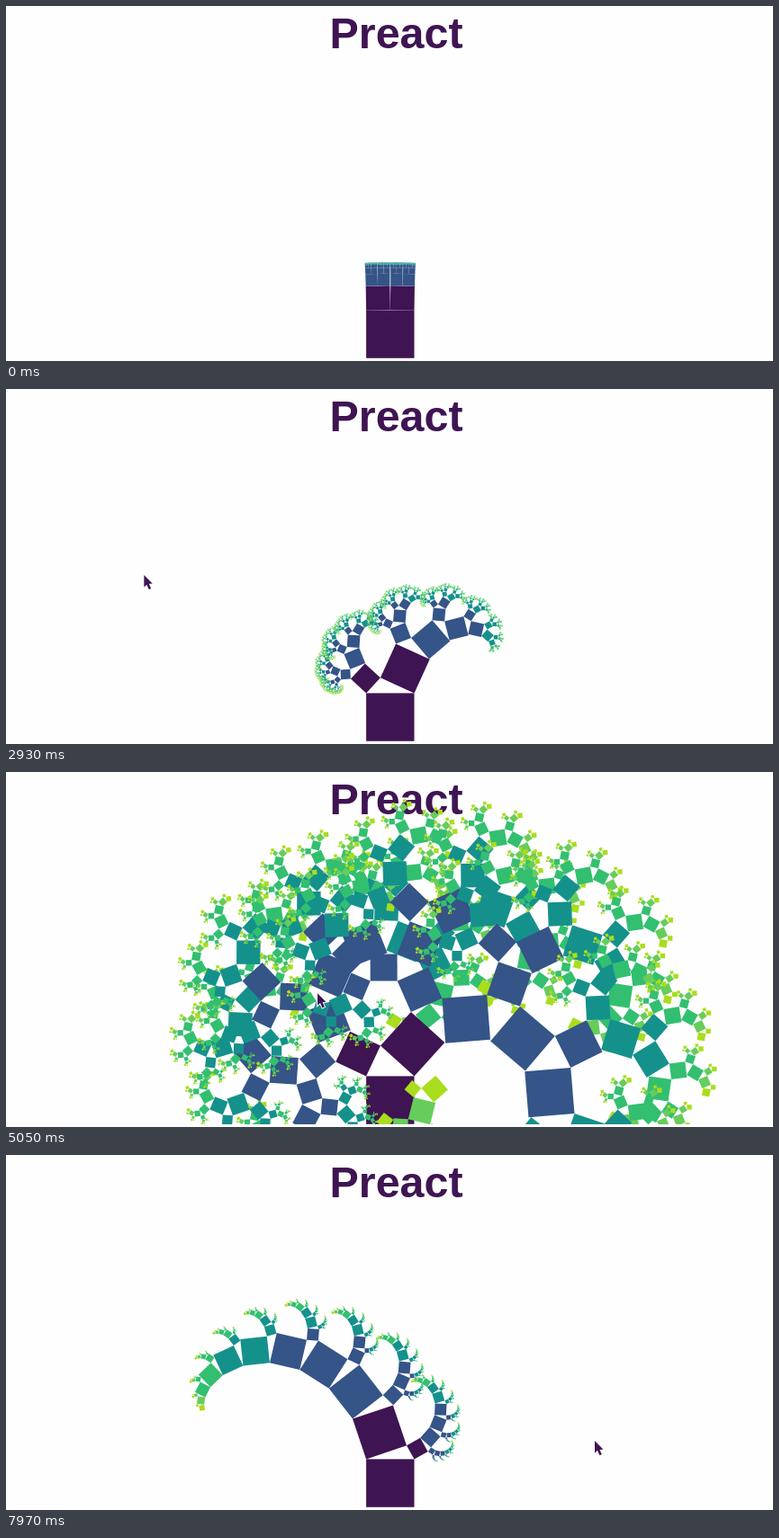
An HTML page with a canvas that plays this animation: 852 by 395 pixels, repeating every 8 s.

```html
<!DOCTYPE html>
<html lang="en">
<head>
<meta charset="utf-8">
<title>Preact</title>
<style>
  html, body { margin: 0; width: 100%; height: 100%; overflow: hidden; background: #fefefe; }
  svg, canvas { position: absolute; left: 0; top: 0; width: 852px; height: 395px; }
  text { font: bold 48.4px "Liberation Sans", Arial, sans-serif; fill: #3f1452; }
</style>
</head>
<body>
<svg viewBox="0 0 852 395"><text x="359.6" y="46.5">Preact</text></svg>
<canvas id="stage" width="852" height="395"></canvas>
<script>
const LOOP = 8000;
const TREE_END = 7910;
const LEVEL_LAG = 33; // each level repaints one tick after its parent
const MAX_LEVEL = 11;
const BASE = 53.4, BASE_X = 400.1, BASE_Y = 338.4;
const MIN_SIZE = BASE / 80;

const [PURPLE, BLUE, TEAL, GREEN, LIME, YELLOW] =
  ['#3f1452', '#355488', '#15918c', '#33bf70', '#66cd5b', '#a9dd1d'];
const COLORS = [PURPLE, PURPLE, BLUE, BLUE, BLUE, TEAL, TEAL, GREEN, GREEN, LIME, YELLOW];

// Pointer position that shapes the tree: time, x, y
const SHAPE_PATH = [
  [600, 426, 396], [900, 450, 290], [1150, 500, 210], [1380, 560, 165],
  [1700, 635, 172], [1950, 645, 172], [2030, 648, 138], [2110, 636, 127],
  [2320, 595, 130], [2550, 470, 185], [2800, 300, 235], [3040, 210, 230],
  [3300, 240, 175], [3540, 310, 160], [3640, 314, 172], [3740, 285, 252],
  [3850, 225, 222], [4100, 190, 180], [4300, 225, 135], [4550, 210, 165],
  [4720, 215, 140], [4850, 240, 85], [4930, 256, 50], [5050, 256, 96],
  [5250, 310, 150], [5500, 310, 165], [5700, 275, 190], [5800, 350, 275],
  [5980, 383, 290], [6330, 430, 288], [6750, 480, 250], [7050, 539, 212],
  [7300, 605, 235], [7600, 650, 268], [7700, 706, 258], [7820, 720, 250],
  [7910, 713, 265]
];

// Visible cursor tip: time, x, y
const CURSOR_PATH = [
  [630, 430, 344], [900, 480, 240], [1150, 560, 140], [1380, 603, 88],
  [1600, 670, 110], [1800, 681, 150], [1980, 650, 125], [2110, 595, 159],
  [2350, 500, 130], [2600, 330, 90], [2850, 140, 170], [3040, 205, 240],
  [3250, 230, 160], [3500, 315, 165], [3640, 285, 250], [3740, 221, 223],
  [4000, 150, 170], [4250, 210, 100], [4500, 240, 180], [4650, 215, 140],
  [4830, 250, 60], [4930, 300, 110], [5050, 346, 246], [5250, 320, 170],
  [5450, 300, 160], [5600, 290, 185], [5750, 360, 275], [5980, 393, 293],
  [6300, 440, 285], [6700, 530, 230], [7050, 607, 177], [7300, 690, 175],
  [7500, 722, 220], [7750, 715, 266], [7910, 679, 311], [7970, 654, 318]
];

const ARROW = [[0, 0], [0, 13.5], [3, 10.8], [5.4, 16.2], [7.8, 15.1], [5.5, 9.9], [9.4, 9.6]];

const ctx = document.getElementById('stage').getContext('2d');

// Smooth curve through the points, held at both ends
function along(path, t) {
  const last = path.length - 1;
  if (t <= path[0][0]) return path[0].slice(1);
  if (t >= path[last][0]) return path[last].slice(1);
  const i = path.findIndex(p => p[0] > t) - 1;
  const a = path[i], b = path[i + 1];
  const before = path[Math.max(i - 1, 0)], after = path[Math.min(i + 2, last)];
  const span = b[0] - a[0], u = (t - a[0]) / span;
  return [1, 2].map(k => {
    const m0 = (b[k] - before[k]) / (b[0] - before[0]) * span;
    const m1 = (after[k] - a[k]) / (after[0] - a[0]) * span;
    const d = b[k] - a[k];
    return a[k] + u * (m0 + u * (3 * d - 2 * m0 - m1 + u * (m0 + m1 - 2 * d)));
  });
}

function shapeAt(t) {
  const [x, y] = along(SHAPE_PATH, t);
  const lean = 0.5 - x / 852;
  const height = Math.max(0, 0.8 * (1 - y / 400));
  return {
    left: Math.hypot(height, 0.5 - lean),
    right: Math.hypot(height, 0.5 + lean),
    leftAngle: Math.atan2(height, 0.5 - lean),
    rightAngle: Math.atan2(height, 0.5 + lean)
  };
}

function drawNode(shapes, level, lefts, side) {
  if (level >= MAX_LEVEL) return;
  const s = shapes[level];
  const w = BASE * s.left ** lefts * s.right ** (level - lefts);
  if (w < MIN_SIZE) return;
  ctx.save();
  if (side === 'left') {
    ctx.rotate(-s.leftAngle);
    ctx.translate(0, -w);
  } else if (side === 'right') {
    ctx.translate(w / s.right, 0);
    ctx.rotate(s.rightAngle);
    ctx.translate(-w, -w);
  }
  ctx.fillStyle = COLORS[level];
  ctx.fillRect(0, 0, w, w);
  drawNode(shapes, level + 1, lefts + 1, 'left');
  drawNode(shapes, level + 1, lefts, 'right');
  ctx.restore();
}

function drawTree(t) {
  const now = Math.min(t, TREE_END);
  const shapes = COLORS.map((_, level) => shapeAt(now - level * LEVEL_LAG));
  ctx.save();
  ctx.beginPath();
  ctx.rect(0, 0, 852, 392);
  ctx.clip();
  ctx.translate(BASE_X, BASE_Y);
  drawNode(shapes, 0, 0, '');
  ctx.restore();
}

function drawCursor(t) {
  if (t < CURSOR_PATH[0][0]) return;
  const [x, y] = along(CURSOR_PATH, t);
  ctx.beginPath();
  ARROW.forEach(([dx, dy]) => ctx.lineTo(x + dx, y + dy));
  ctx.closePath();
  ctx.lineWidth = 2;
  ctx.strokeStyle = '#fefefe';
  ctx.stroke();
  ctx.fillStyle = PURPLE;
  ctx.fill();
}

const start = performance.now();

function frame() {
  const t = (performance.now() - start) % LOOP;
  ctx.clearRect(0, 0, 852, 395);
  drawTree(t);
  drawCursor(t);
  requestAnimationFrame(frame);
}
frame();
</script>
</body>
</html>
```
